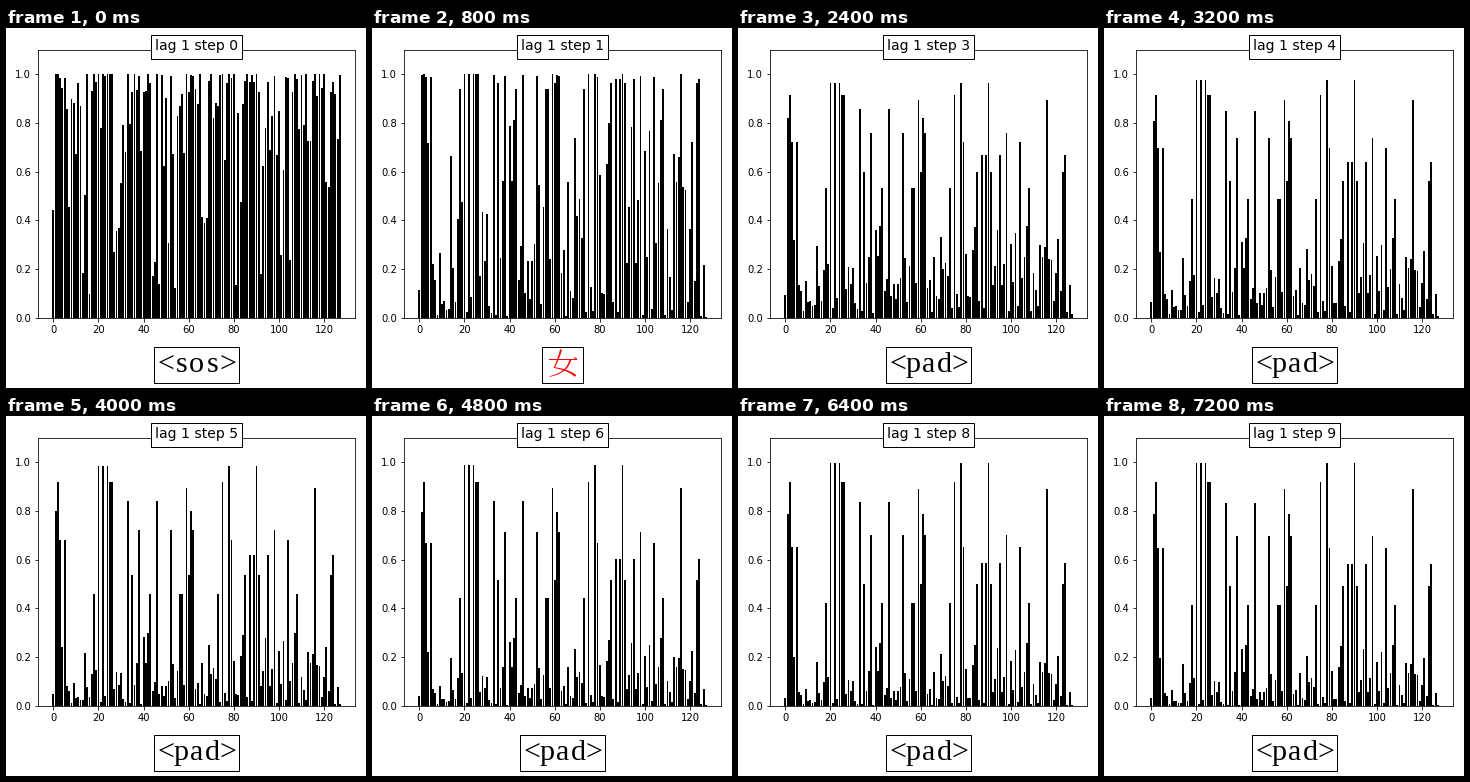
Write a matplotlib script that moves like this. It is 360 px wide and 360 px high and loops after 8000 ms.

```python
import numpy as np
import matplotlib.pyplot as plt
from matplotlib.animation import FuncAnimation
from matplotlib.patches import Rectangle, Polygon

STEPS = 10
N = 128
FADE = .7  # share of the initial state kept from step to step

# Units that stay active, by settled level
PEAKS = {1: (20, 22, 24, 78, 90), .92: (2, 25, 26, 75), .89: (59, 116),
         .83: (33, 46), .78: (1, 61), .69: (38, 52, 62, 98),
         .64: (3, 5, 79, 104), .57: (87, 89, 95, 124),
         .48: (35, 60, 85, 91, 123), .4: (18, 43, 56, 57, 73, 108)}


def build_steps():
    rng = np.random.default_rng(8)
    settled = .24 * rng.random(N) ** 2 + .002
    for level, units in PEAKS.items():
        settled[list(units)] = level
    first = np.maximum(rng.beta(.85, .33, N), 1 - (1 - settled) ** 4)
    start = .95 * np.sqrt(settled)
    logit = np.log(start / (1 - start))
    second = 1 / (1 + np.exp(-2.3 * logit - 1.8))
    keep = FADE ** np.arange(STEPS - 2)
    return [first, second, *(start ** k * settled ** (1 - k) for k in keep)]


LEVELS = build_steps()

plt.rcParams["font.family"] = "DejaVu Sans"
fig = plt.figure(figsize=(5, 5), dpi=72, facecolor="white")
ax = fig.add_axes([32.05 / 360, .195, 317.15 / 360, .745])
bars = ax.bar(range(N), LEVELS[0], color="black")
ax.set_ylim(0, 1.1)

# Overlay in pixel units for the two boxed labels
page = fig.add_axes([0, 0, 1, 1])
page.set(xlim=(0, 360), ylim=(360, 0))
page.axis("off")


def box(x, y, w, h):
    return page.add_patch(Rectangle((x, y), w, h, fc="white", ec="black", lw=1))


box(145.2, 6.8, 91, 24)
title = page.text(190.8, 22, "", ha="center", fontsize=14)
frame = box(148.2, 318.8, 85, 36)
letters = [page.text(190.8 + 15.4 * i, 344, "", ha="center", fontsize=30,
                     family="Liberation Serif") for i in range(-2, 3)]


def brush(p0, p1, p2, w0, w1):
    """Tapered stroke along a quadratic curve."""
    t = np.linspace(0, 1, 24)[:, None]
    p0, p1, p2 = map(np.array, (p0, p1, p2))
    mid = (1 - t) ** 2 * p0 + 2 * t * (1 - t) * p1 + t ** 2 * p2
    d = np.gradient(mid, axis=0)
    normal = np.c_[-d[:, 1], d[:, 0]] / np.hypot(*d.T)[:, None]
    half = (w0 + (w1 - w0) * t) / 2
    edge = np.r_[mid + normal * half, (mid - normal * half)[::-1]]
    return page.add_patch(Polygon(edge, fc="red", ec="none"))


glyph = [
    brush((177, 331.5), (190, 331.5), (205, 331.5), 1, 1),
    brush((202, 329.5), (203.5, 330.5), (205, 331.5), 1, 1.4),
    brush((189, 321.5), (187, 330), (182, 340), 2, 1),
    brush((182, 339.5), (197, 342), (203.5, 348), .9, 2.2),
    brush((198.5, 331.5), (195, 345), (177.5, 348.5), 1.8, .7),
]


def draw(step):
    for bar, h in zip(bars, LEVELS[step]):
        bar.set_height(h)
    title.set_text(f"lag 1 step {step}")
    single = step == 1
    word = {0: "<sos>", 1: "     ", 2: "<eos>"}.get(step, "<pad>")
    for letter, char in zip(letters, word):
        letter.set_text(char)
    for part in glyph:
        part.set_visible(single)
    frame.set_x(170.2 if single else 148.2)
    frame.set_width(41 if single else 85)
    return [*bars, title, frame, *letters, *glyph]


anim = FuncAnimation(fig, draw, frames=STEPS, interval=800, repeat=True,
                     repeat_delay=0, blit=False)
plt.show()
```
